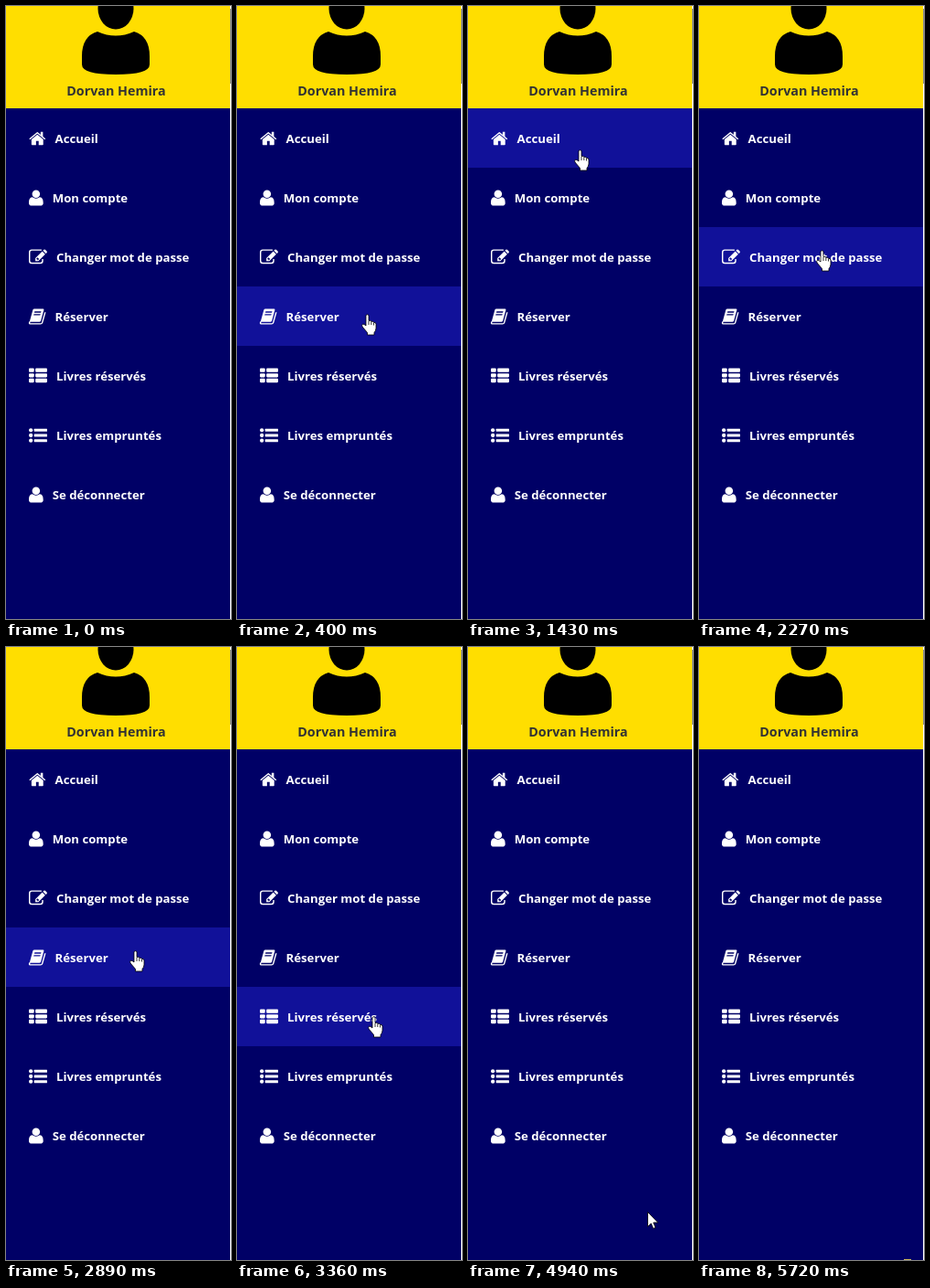
An HTML page for the animation above (5870 ms loop, 246x671 px).

```html
<!DOCTYPE html>
<html lang="fr">
<head>
<meta charset="utf-8">
<title>Menu</title>
<style>
  html, body { margin: 0; width: 100%; height: 100%; overflow: hidden; background: #fff; }
  svg { display: block; }
  text { font: bold 13.2px "Open Sans", "Noto Sans", sans-serif; fill: #fff; }
  #user-name { font-size: 14.3px; fill: #333; text-anchor: middle; }
  .icon { fill: #fff; fill-rule: evenodd; }
  .line { fill: none; stroke: #fff; stroke-width: 128; stroke-linejoin: round; }
  .cursor { fill: #fff; stroke: #000; stroke-width: .8; stroke-linejoin: round; }
</style>
</head>
<body>
<svg width="246" height="671" viewBox="0 0 246 671">
  <defs>
    <g id="home">
      <path d="M1472 989V1472Q1472 1536 1408 1536H1024V1152H768V1536H384Q320 1536 320 1472V989L896 512Z"/>
      <path d="M1216 256H1440V760L1216 580Z"/>
      <path class="line" d="M135 965L896 331L1657 965"/>
    </g>
    <g id="user">
      <circle cx="896" cy="512" r="384"/>
      <path d="M1600 1405C1600 1564 1500 1664 1333 1664H459C292 1664 192 1564 192 1405C192 1100 280 832 525 832C590 832 700 971 896 971S1202 832 1267 832C1512 832 1600 1100 1600 1405Z"/>
    </g>
    <g id="edit">
      <path class="line" d="M1235 205Q1180 192 1120 192H288Q64 192 64 416V1248Q64 1472 288 1472H1120Q1344 1472 1344 1248V1080"/>
      <path d="M1312 320l288 288-672 672H640V992ZM888 1184l116-116-152-152-116 116v56h96v96h56z"/>
      <path d="M1756 452l-92 92-288-288 92-92q68-56 136 0l152 152q56 68 0 136z"/>
    </g>
    <g id="book">
      <g transform="skewX(-15.5)">
        <path d="M640 128H1480Q1600 128 1600 250V1290Q1600 1408 1480 1408H520V250Q520 128 640 128ZM740 384h640v128h-640zM740 640h640v128h-640z"/>
        <path class="line" d="M1790 470V1480Q1790 1600 1670 1600H640Q500 1600 540 1370"/>
      </g>
    </g>
    <g id="grid-row">
      <rect y="-192" width="512" height="384" rx="96"/>
      <rect x="640" y="-192" width="1152" height="384" rx="96"/>
    </g>
    <g id="list-row">
      <circle cx="192" r="192"/>
      <rect x="512" y="-128" width="1280" height="256" rx="32"/>
    </g>
    <g id="grid"></g>
    <g id="list"></g>
  </defs>

  <rect width="245" height="671" fill="#006"/>
  <rect width="245" height="112" fill="#ffde00"/>
  <rect x="245" y="3" width="1" height="82" fill="#8b8b8b"/>
  <ellipse cx="120" cy="3" rx="19.5" ry="22.5"/>
  <path d="M100 28Q120 37 140 28Q157 33 157 55V64Q157 75 120 75Q83 75 83 64V55Q83 33 100 28Z"/>
  <text id="user-name" x="120.5" y="98">Dorvan Hemira</text>

  <rect id="hover" width="245" height="65" fill="#119"/>
  <g id="menu"></g>

  <g id="hand" class="cursor">
    <path d="M5 1.5Q6.5 0 8 1.5V7.5Q10 7 11 8.3Q13 8 13.5 9.3Q16 9 16 11.5V16Q15.5 19 14 20.5V23H6.5V20.5L1 14Q0 10.5 3 11.5L5 13Z"/>
    <path d="M8 8v4M10.8 8.5v3.5M13.5 9.5v3"/>
  </g>
  <path id="arrow" class="cursor" d="M.5 .5V16.5L4.2 13L6.6 18.5L9 17.5L6.7 12H11.7Z"/>
  <rect id="edge" x="224" y="670" width="8" height="1" fill="#c8b45a"/>
</svg>
<script>
const LOOP = 5870, TICK = 78, TOP = 112, ROW = 65;
const ICON_BOX = 1792, ICON_SCALE = 20 / ICON_BOX;
const iconWidths = { home: 1664, user: 1408, book: 1664 };
const items = [
  ["home", "Accueil"],
  ["user", "Mon compte"],
  ["edit", "Changer mot de passe"],
  ["book", "Réserver"],
  ["grid", "Livres réservés"],
  ["list", "Livres empruntés"],
  ["user", "Se déconnecter"],
];
const ENTRY_ROW = 8.37;
// Pointer stops: departure, arrival, height in menu rows
const stops = [
  [170, 550, 2.86],
  [870, 870, 1],
  [960, 960, 0.75],
  [1260, 1890, 1.77],
  [2120, 2350, 2.65],
  [2730, 2960, 3.66],
  [3210, 3450, 4.77],
  [3770, 4000, 5.7],
  [4320, 4460, 6.85],
  [4850, 5010, 8.2],
  [5240, 5240, 8.48],
];
const $ = id => document.getElementById(id);

for (const name of ["grid", "list"]) {
  $(name).innerHTML = [0, 1, 2].map(i =>
    `<use href="#${name}-row" y="${320 + i * 512 + (name === "list" ? 64 : 0)}"/>`).join("");
}

$("menu").innerHTML = items.map(([icon, label], i) => {
  const width = iconWidths[icon] || ICON_BOX;
  return `<g transform="translate(25 ${TOP + i * ROW})">
    <use href="#${icon}" class="icon" transform="translate(0 33) scale(${ICON_SCALE}) translate(${(width - ICON_BOX) / 2} ${-ICON_BOX / 2})"/>
    <text x="${width * ICON_SCALE + 10}" y="38">${label}</text>
  </g>`;
}).join("");

const easeInOut = p => p < 0.5 ? 4 * p ** 3 : 1 - 4 * (1 - p) ** 3;

// The pointer advances once per tick, as in a screen recording.
function pointerRow(t) {
  let row = ENTRY_ROW;
  for (const [start, end, target] of stops) {
    if (t < start) break;
    const ticks = Math.round((end - start) / TICK) + 1;
    const passed = Math.floor((t - start) / TICK + 0.15) + 1;
    row += (target - row) * easeInOut(Math.min(1, passed / ticks));
  }
  return row;
}

function show(id, visible, x = 0, y = 0) {
  $(id).setAttribute("visibility", visible ? "visible" : "hidden");
  $(id).setAttribute("transform", `translate(${Math.round(x)} ${Math.round(y)})`);
}

function draw() {
  const t = performance.now() % LOOP;
  const row = pointerRow(t);
  // Drifts right on the way down, faster below the menu
  const x = 110 + 7 * row + 30 * Math.max(0, row - items.length);
  const y = TOP + ROW * row - 14;
  const present = t >= 170 && t < 5320;
  const hovering = present && row < items.length;
  show("hover", hovering, 0, TOP + Math.floor(row) * ROW);
  show("hand", hovering, x, y);
  show("arrow", present && !hovering, x, y);
  show("edge", t >= 5720);
  requestAnimationFrame(draw);
}
draw();
</script>
</body>
</html>
```
